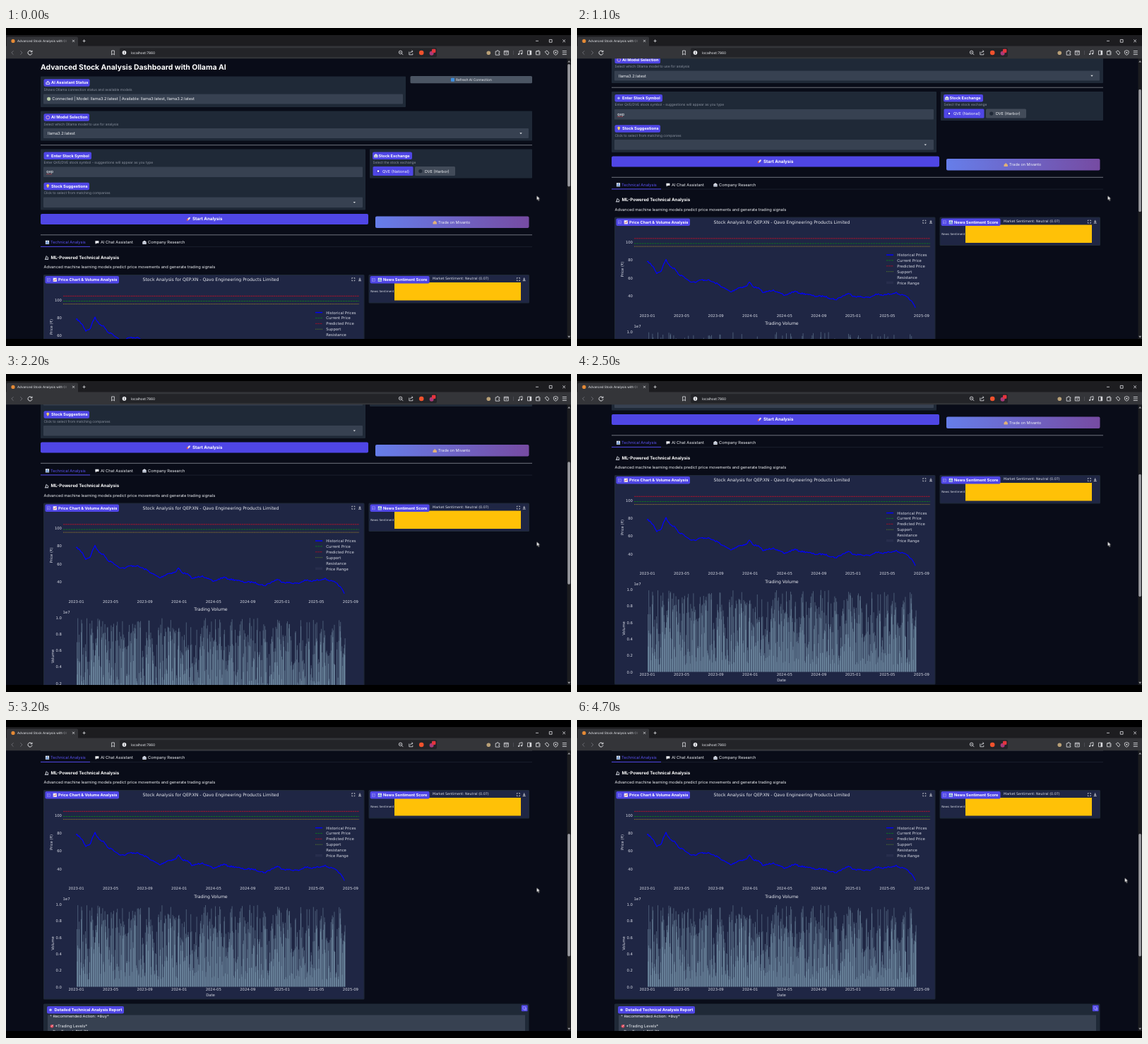
These frames come from a looping animation (800 px wide and 450 px high, 5 s). An HTML page:

```html
<!DOCTYPE html>
<html lang="en">
<head>
<meta charset="utf-8">
<title>Stock dashboard</title>
<style>
@property --s { syntax: "<length>"; inherits: true; initial-value: 0px; }
html, body { margin: 0; width: 100%; height: 100%; overflow: hidden; background: #000; }
svg { display: block; width: 800px; height: 450px; }
text { font: 5.7px Inter, "Open Sans", sans-serif; fill: #eef0f4; text-rendering: geometricPrecision; white-space: pre; }
.b { font-weight: 700; font-size: 5.65px; fill: #fff; }
.h { font-weight: 700; font-size: 6.2px; fill: #fff; }
.sub { font-size: 4.9px; fill: #8b929f; }
.c { text-anchor: middle; }
.r { text-anchor: end; }
.plot text { font: 5.3px "DejaVu Sans", sans-serif; fill: #d9dce6; }
.plot .t { font-size: 6.15px; fill: #e8eaf0; }
.panel { fill: #1f2937; }
.field { fill: #374151; }
.acc { fill: #4f46e5; }
.fig { fill: #1f2644; }
.bar { fill: #343539; }
.ln { fill: none; stroke: #e3e4e8; stroke-width: .8; }
.dim { stroke: #77787f; }
.hr { stroke: #8a8e97; stroke-width: .8; }

#stage { animation: scroll 5s step-end infinite; }
#page { transform: translateY(calc(var(--s) * -1)); }
#thumb { transform: translateY(calc(var(--s) * .44)); }
#mouse { animation: mouse 5s step-end infinite; }

/* wheel scrolling, 41.67px per notch, redrawn every 100ms */
@keyframes scroll {
  0% { --s: 0px } 18% { --s: 26.5px } 20% { --s: 61px } 22% { --s: 81.5px } 24% { --s: 83.3px }
  38% { --s: 87px } 40% { --s: 116px } 42% { --s: 152px } 44% { --s: 166.5px }
  46% { --s: 174px } 48% { --s: 192px } 50% { --s: 206px } 52% { --s: 208.3px }
  58% { --s: 217px } 60% { --s: 235px } 62% { --s: 248px } 64%, 100% { --s: 250px }
}
@keyframes mouse {
  0% { transform: translate(751.5px, 237.3px) }
  82% { transform: translate(751.8px, 237.5px) }
  90% { transform: translate(758px, 234px) }
  92% { transform: translate(769px, 227.5px) }
  94%, 100% { transform: translate(775.6px, 223.3px) }
}
</style>
</head>
<body>
<svg id="stage" viewBox="0 0 800 450">
<defs>
  <clipPath id="view"><rect y="43" width="800" height="397"/></clipPath>
  <clipPath id="report"><rect x="59" y="667.5" width="676" height="60"/></clipPath>
  <linearGradient id="trade"><stop stop-color="#667eea"/><stop offset="1" stop-color="#764ba2"/></linearGradient>
  <linearGradient id="fade"><stop stop-color="#343539" stop-opacity="0"/><stop offset="1" stop-color="#343539"/></linearGradient>
  <g id="bars"><rect x="-2.6" y="-2.6" width="5.2" height="5.2" fill="#dfe4ec"/><path d="M-1.4 2V-.5M.2 2V-2M1.7 2V.3" stroke="#3f78c9" stroke-width="1"/></g>
  <g id="trend"><rect x="-2.6" y="-2.6" width="5.2" height="5.2" fill="#eef0f5"/><path d="M-2 1.5L-.5 0L.5 .8L2 -1.6" fill="none" stroke="#d7404b" stroke-width=".8"/></g>
  <g id="bot"><path d="M-2.4 2.2v-2.6h4.8v2.6z" fill="none" stroke="#e9ecf4" stroke-width=".9"/><path d="M-1.3 -1.9h2.6M0 -1.8v1" stroke="#e9ecf4" stroke-width=".8"/></g>
  <g id="rocket"><ellipse rx="3" ry="1.3" transform="rotate(-45)" fill="#e6dfe6"/><path d="M-2.8 .3l1.4 -1l.8 2.4l-2.2 1z" fill="#e0504e"/></g>
  <g id="bank"><path d="M-2.7 -.8L0 -2.7L2.7 -.8V2.5H-2.7z" fill="#dfe2ea"/><path d="M-1.3 0v1.6M0 0v1.6M1.3 0v1.6" stroke="#6b7fa5" stroke-width=".6"/></g>
  <g id="scope"><path d="M-2.6 2.5h5.2M-1.5 2.2L-.2 -2.4M1.6 2C2.8 .5 1.8 -1 .4 -1" fill="none" stroke="#dde1ea" stroke-width="1"/></g>
  <g id="frame"><rect x="-2" y="-2" width="4" height="4" fill="none" stroke="#9f9af2" stroke-width=".6"/><path d="M-1 1V-.4M.3 1V-1" stroke="#9f9af2" stroke-width=".6"/></g>
  <path id="caret" d="M-1.7 -.9h3.4L0 1z" fill="#e5e7eb"/>
  <path id="expand" class="ln" d="M-2 -.8V-2H-.8M.8 -2H2V-.8M2 .8V2H.8M-.8 2H-2V.8"/>
  <path id="down" class="ln" d="M0 -2.2V.8M-1.3 -.5L0 .9L1.3 -.5M-2 2H2"/>
</defs>

<rect width="800" height="450"/>
<g clip-path="url(#view)">
  <rect y="43" width="800" height="397" fill="#090c18"/>
  <g id="page">
    <text class="b" style="font-size:10.4px" x="49" y="59.3">Advanced Stock Analysis Dashboard with Ollama AI</text>

    <rect class="panel" x="49" y="68.5" width="517" height="43.5" rx="1"/>
    <rect class="acc" x="53.5" y="72.3" width="65" height="10.4" rx="2"/>
    <use href="#bot" x="59.3" y="77.4"/>
    <text class="b" x="64" y="79.4">AI Assistant Status</text>
    <text class="sub" x="53.5" y="88.6">Shows Ollama connection status and available models</text>
    <rect class="field" x="53" y="93.5" width="509" height="14" rx="1"/>
    <circle cx="60.6" cy="100.3" r="2.6" fill="#b4c9a6"/>
    <text x="65.3" y="102.2">Connected | Model: llama3.2:latest | Available: llama3:latest, llama3.2:latest</text>
    <rect x="572.5" y="68" width="172.5" height="10.3" rx="1.6" fill="#4b5563"/>
    <rect x="630" y="70.7" width="5" height="5" rx=".8" fill="#3f8fe0"/>
    <text style="font-size:4.8px" x="637" y="75">Refresh AI Connection</text>

    <rect class="panel" x="49" y="117.5" width="696" height="42" rx="1"/>
    <rect class="acc" x="53.5" y="121.3" width="64.5" height="10.4" rx="2"/>
    <circle cx="59.3" cy="126.5" r="2.4" fill="none" stroke="#d7a4d2" stroke-width="1"/>
    <text class="b" x="64" y="128.4">AI Model Selection</text>
    <text class="sub" x="53.5" y="137.8">Select which Ollama model to use for analysis</text>
    <rect class="field" x="53" y="142" width="687" height="14" rx="1"/>
    <text x="59" y="151">llama3.2:latest</text>
    <use href="#caret" x="729" y="149.2"/>
    <path class="hr" d="M49 165.7H745"/>

    <rect class="panel" x="49" y="171.5" width="460" height="86" rx="1"/>
    <rect class="acc" x="53.5" y="175.5" width="67.5" height="10.4" rx="2"/>
    <circle cx="59" cy="180.7" r="1.7" fill="#a9b7f5"/>
    <text class="b" x="64" y="182.6">Enter Stock Symbol</text>
    <text class="sub" x="53.5" y="191.7">Enter QVE/DVE stock symbol - suggestions will appear as you type</text>
    <rect class="field" x="53" y="196.5" width="452" height="14.5" rx="1"/>
    <text x="57" y="205.4">qep</text>
    <path d="M57 207.2l1 -.7l1 .7l1 -.7l1 .7l1 -.7l1 .7l1 -.7l1 .7" fill="none" stroke="#d0454c" stroke-width=".6"/>
    <rect class="acc" x="53.5" y="218.8" width="64.5" height="10.4" rx="2"/>
    <path d="M58.2 225.8v-1.2a1.9 1.9 0 1 1 2 0v1.2z" fill="#f4d35e"/>
    <text class="b" x="64" y="225.9">Stock Suggestions</text>
    <text class="sub" x="53.5" y="235.2">Click to select from matching companies</text>
    <rect class="field" x="53" y="239.5" width="452" height="14.5" rx="1"/>
    <use href="#caret" x="493.3" y="246.8"/>

    <rect class="panel" x="515" y="171.5" width="230" height="41" rx="1"/>
    <rect class="acc" x="519" y="175.5" width="56" height="10.4" rx="2"/>
    <use href="#bank" x="523.8" y="180.8"/>
    <text class="b" x="527.5" y="182.6">Stock Exchange</text>
    <text class="sub" x="519.5" y="191.7">Select the stock exchange</text>
    <rect class="acc" x="519.5" y="196" width="57" height="13" rx="1.5"/>
    <circle cx="527" cy="202.6" r="2.6" fill="#4338ca"/><circle cx="527" cy="202.6" r="1.3" fill="#fff"/>
    <text style="font-size:5.5px" x="533" y="204.5">QVE (National)</text>
    <rect x="579" y="196" width="57" height="13" rx="1.5" fill="#424b59"/>
    <circle cx="586.8" cy="202.6" r="2.6" fill="#1f2937"/>
    <text style="font-size:5.5px" x="593" y="204.5">DVE (Harbor)</text>

    <rect class="acc" x="49" y="263" width="464" height="15" rx="2"/>
    <use href="#rocket" x="258.6" y="270.2"/>
    <text class="h" x="264" y="272.3">Start Analysis</text>
    <rect x="523" y="266.5" width="217.5" height="16.5" rx="2" fill="url(#trade)"/>
    <path d="M604.5 275l2.7 -2.6l2.7 2.6v2.6h-5.4z" fill="#e0b078"/>
    <text style="font-size:5.5px" x="612" y="276.9">Trade on Mivanto</text>
    <path class="hr" d="M49 292.8H745"/>

    <use href="#bars" x="58.5" y="303.3"/>
    <text x="63" y="305.2" style="fill:#5b52f0">Technical Analysis</text>
    <path d="M126.4 301.3h5v3.2h-3l-1.6 1.5v-1.5h-.4z" fill="#eef0f4"/>
    <text x="134" y="305.2">AI Chat Assistant</text>
    <use href="#bank" x="196" y="303.4"/>
    <text x="201" y="305.2">Company Research</text>
    <path d="M49 309.6H745" stroke="#262d3c" stroke-width=".6"/>
    <path d="M49 309.4H119" stroke="#4f46e5" stroke-width="1"/>
    <use href="#scope" x="57.5" y="324.8"/>
    <text class="h" x="63.5" y="326.8">ML-Powered Technical Analysis</text>
    <text x="53.5" y="340.4">Advanced machine learning models predict price movements and generate trading signals</text>

    <g class="plot">
      <rect class="panel" x="53" y="349" width="454.5" height="296.5" rx="1.5"/>
      <rect class="fig" x="54" y="350" width="452.5" height="294.5"/>
      <text class="t c" x="290" y="358.2">Stock Analysis for QEP.XN - Qavo Engineering Products Limited</text>
      <g fill="none" stroke-width=".9">
        <path d="M81 379.3H500" stroke="#b3122b" stroke-dasharray="2.6 .6"/>
        <path d="M81 386.5H500" stroke="#0d7a1c" stroke-dasharray="2.6 1"/>
        <path d="M81 390.6H500" stroke="#a8862a" stroke-dasharray="1 .8"/>
        <path d="M438 402.6h10" stroke="#00f" stroke-width="1.4"/>
        <path d="M438 410.4h10" stroke="#0d7a1c" stroke-dasharray="2.6 1"/>
        <path d="M438 418.3h10" stroke="#a01028" stroke-dasharray="2.6 .6"/>
        <path d="M438 426.2h10" stroke="#5d8226" stroke-dasharray="1 .8"/>
        <g stroke="#00f" stroke-linecap="round" stroke-linejoin="round">
          <path id="price" stroke-width="1.1"/>
          <use href="#price" stroke-width="2.1" stroke-dasharray="0 2.6"/>
        </g>
        <path id="volume" stroke="#add8e6" stroke-width=".4" opacity=".75"/>
      </g>
      <rect x="438" y="440" width="10" height="3.6" fill="#272d4c"/>
      <g id="ticks"></g>
      <text class="c" transform="translate(66 423) rotate(-90)">Price (₹)</text>
      <text class="c" transform="translate(67.5 566) rotate(-90)">Volume</text>
      <text class="t c" x="290" y="501.8">Trading Volume</text>
      <text x="80.5" y="505">1e7</text>
      <text class="c" x="289.5" y="640.6">Date</text>

      <rect class="panel" x="513.5" y="349" width="227.5" height="40.5" rx="1.5"/>
      <rect class="fig" x="514.5" y="350" width="225.5" height="38.5"/>
      <text x="604" y="356.3" style="font-size:4.8px">Market Sentiment: Neutral (0.07)</text>
      <rect x="550" y="360" width="179" height="25.5" fill="#ffc107"/>
      <text class="r" x="549.3" y="374.3" style="font-size:4.05px">News Sentiment</text>
    </g>
    <rect class="acc" x="55.4" y="351" width="104.6" height="10.6" rx="2"/>
    <use href="#frame" x="60.3" y="356.3"/><use href="#trend" x="69.3" y="356.3"/>
    <text class="b" x="74" y="358.3">Price Chart &amp; Volume Analysis</text>
    <use href="#expand" x="491.8" y="355.7"/><use href="#down" x="501" y="355.7"/>
    <rect class="acc" x="515.6" y="351" width="84" height="10.6" rx="2"/>
    <use href="#frame" x="520.6" y="356.3"/><use href="#bars" x="529.3" y="356.3"/>
    <text class="b" x="534" y="358.3">News Sentiment Score</text>
    <use href="#expand" x="725.4" y="355.6"/><use href="#down" x="733.7" y="355.6"/>

    <rect class="panel" x="53" y="651.5" width="687.5" height="90" rx="1.5"/>
    <rect class="acc" x="58" y="655" width="109" height="10.6" rx="2"/>
    <circle cx="63" cy="660.3" r="1.8" fill="#c5cdf8"/>
    <text class="b" x="68.5" y="662.3">Detailed Technical Analysis Report</text>
    <rect class="acc" x="729.8" y="653.5" width="8.8" height="8.8" rx="1"/>
    <path d="M732 655.8h3.4v3.4h-3.4zM733.4 660.4h3.2v-3.4" fill="none" stroke="#b9b5fa" stroke-width=".6"/>
    <rect class="field" x="59" y="667.5" width="676" height="74"/>
    <g clip-path="url(#report)">
      <text x="62" y="671">* Recommended Action: *Buy*</text>
      <circle cx="65" cy="683.3" r="2.4" fill="#dd4a5c"/><path d="M64.2 684l2.8 -2.8" stroke="#fff" stroke-width=".7"/>
      <text x="69.5" y="685.2">*Trading Levels*</text>
      <text x="62" y="692.7">- Buy Target: ₹25.73</text>
    </g>
  </g>
  <rect x="794.5" y="43" width="5.5" height="397" fill="#1b1c20"/>
  <path d="M795.2 48.6h4l-2 -2.6zM795.2 435.8h4l-2 2.6z" fill="#9b9ca1"/>
  <rect id="thumb" x="795.2" y="51" width="3.7" height="173.5" rx="1.8" fill="#98999e"/>
</g>

<!-- browser bar -->
<rect y="10" width="800" height="16" fill="#1d1d20"/>
<path class="bar" d="M1 26V14.5q0 -2 2 -2h97q2 0 2 2V26z"/>
<rect class="bar" y="25.5" width="800" height="17.8"/>
<rect x="161" y="28.3" width="449" height="13" rx="2" fill="#232428"/>
<circle cx="10" cy="18.4" r="2.6" fill="#e58a35"/>
<text x="16" y="20" style="font-size:4.5px">Advanced Stock Analysis with Ol</text>
<rect x="78" y="14" width="12" height="9" fill="url(#fade)"/>
<path class="ln" d="M94 16.8l3 3m0 -3l-3 3M108.6 18.3h4M110.6 16.3v4M750 18.3h4M769.3 16.4h3.8v3.8h-3.8zM788.2 16.4l3.8 3.8m0 -3.8l-3.8 3.8"/>
<path class="ln dim" d="M10.5 32.3L7.8 35l2.7 2.7M20.3 32.3L23 35l-2.7 2.7"/>
<path class="ln" style="stroke-width:1" d="M36.4 33.2A3 3 0 1 0 37 35.6M37 31.8v2h-2.2"/>
<path class="ln" d="M149.6 32h3.8v6l-1.9 -1.6l-1.9 1.6z"/>
<circle cx="167.5" cy="34.9" r="2.8" fill="#e9eaee"/><path d="M167.5 34.5v2M167.5 33v.8" stroke="#111" stroke-width=".7"/>
<text x="177" y="36.8" style="font-size:4.9px">localhost:7860</text>
<circle class="ln" cx="558.6" cy="34.4" r="2.3"/>
<path class="ln" d="M560.3 36.1l2 2M557.5 34.4h2.2M570.8 33.5v4.3h5v-2M572.3 35.6q.4 -2.6 3.6 -2.6M574.6 31.5l1.5 1.5l-1.5 1.5"/>
<circle cx="588.2" cy="35" r="3.3" fill="#f0522d"/>
<circle cx="602.6" cy="35.8" r="3" fill="#a93a78"/>
<rect x="603" y="29.8" width="5.4" height="5.2" rx="1.2" fill="#e5343d"/>
<circle cx="683.3" cy="35.2" r="2.8" fill="#b9a076"/>
<path class="ln" d="M693.2 33h2q0 -1.5 1 -1.5t1 1.5h1.6v1.8q-1.2 0 -1.2 .9t1.2 .9v1.6h-5.6zM705.3 32.3h6v5.6h-6zM705.3 33.8h6M707.3 35.8h2.2M727 37V32.6l4 -.9V36.2M738.5 32.2h5.2v5.6h-5.2zM750.5 33h5.4v4.8h-5.4zM750.5 33l4 -1.2v1.2M754 35.4h1.8M763.2 33.7l2.8 -1.8l2.8 3.2l-2 3zM778.3 31.6l2.9 1v2.3q0 2.2 -2.9 3.4q-2.9 -1.2 -2.9 -3.4v-2.3zM787.8 32.5h6M787.8 35h6M787.8 37.5h6"/>
<path d="M741.6 32.2h2.2v5.6h-2.2z" fill="#e3e4e8"/>
<circle cx="726" cy="37" r="1.1" fill="#e3e4e8"/><circle cx="730" cy="36.3" r="1.1" fill="#e3e4e8"/>
<circle cx="778.3" cy="34.8" r="1" fill="#e3e4e8"/>
<path d="M718.5 32v6" stroke="#5c5d63" stroke-width=".6"/>

<path id="mouse" d="M0 0v6.3l1.5 -1.3l1.1 2.4l1.1 -.5l-1.1 -2.3h2z" fill="#fff" stroke="#111" stroke-width=".4"/>
</svg>
<script>
const $ = id => document.getElementById(id);
let seed = 7;
const rnd = () => (seed = seed * 16807 % 2147483647) / 2147483647;

function label(x, y, str, cls) {
  const t = document.createElementNS("http://www.w3.org/2000/svg", "text");
  t.setAttribute("x", x);
  t.setAttribute("y", y);
  t.setAttribute("class", cls);
  t.textContent = str;
  $("ticks").append(t);
}

for (let i = 0; i < 9; i++) {
  const date = 2023 + Math.floor(i / 3) + "-0" + (1 + i % 3 * 4);
  for (const y of [490, 633]) label(99.5 + 48.55 * i, y, date, "c");
}
for (let v = 40; v <= 100; v += 20) label(79, 386.6 + (100 - v) * 1.265, v, "r");
for (let i = 0; i <= 5; i++) label(79, 629.5 - 23.3 * i, (i / 5).toFixed(1), "r");
["Historical Prices", "Current Price", "Predicted Price", "Support", "Resistance", "Price Range"]
  .forEach((s, i) => label(453.3, 404.5 + 7.9 * i, s, ""));

// price: x, y pairs joined with a little jitter
const pts = [
  99.5, 412, 103, 414, 106, 418, 109, 421, 113, 429, 116, 427, 119.5, 425, 122.5, 416,
  126, 409, 129, 415, 132, 419, 139, 423, 145, 431, 151, 433, 157, 438, 163, 441, 169, 441,
  175, 438, 185, 438, 195, 442, 200, 444, 207, 449, 218, 455, 229, 449, 240, 447, 244, 441,
  250, 448, 256, 449, 264, 456, 278, 452, 285, 456, 294, 460, 308, 454, 316, 457, 326, 458,
  336, 461, 350, 461, 366, 466, 384, 457, 392, 461, 414, 463, 424, 458, 432, 460, 451, 456,
  459, 459, 467, 462, 473, 467, 479, 477];
let d = "M" + pts[0] + " " + pts[1];
for (let i = 2; i < pts.length; i += 2) {
  const [x0, y0, x1, y1] = pts.slice(i - 2, i + 2);
  const n = Math.ceil((x1 - x0) / 1.5);
  for (let k = 1; k <= n; k++) {
    const wob = k < n ? (rnd() - .5) * 2.2 : 0;
    d += `L${(x0 + (x1 - x0) * k / n).toFixed(1)} ${(y0 + (y1 - y0) * k / n + wob).toFixed(1)}`;
  }
}
$("price").setAttribute("d", d);

// one volume bar per trading day, none at weekends
let bars = "";
for (let day = 0; day < 950; day++) {
  if (day % 7 > 4) continue;
  bars += `M${(100.5 + day * .4).toFixed(1)} 627.5v${-(10 + 106 * rnd()).toFixed(1)}`;
}
$("volume").setAttribute("d", bars);
</script>
</body>
</html>
```
